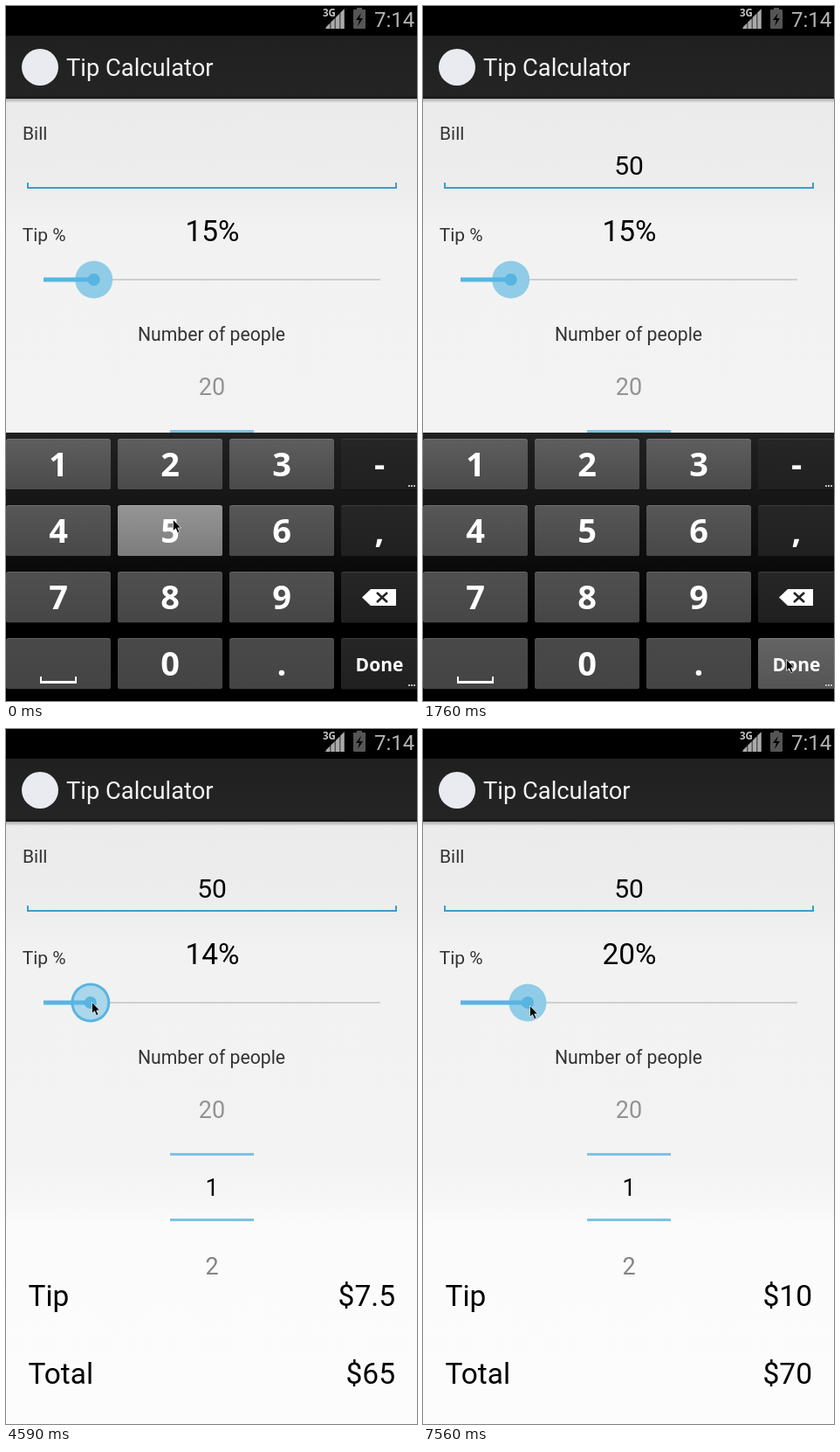
Write an HTML page with a canvas that moves like this. It is 471x795 px and loops after 8000 ms.

```html
<!DOCTYPE html>
<html lang="en">
<head>
<meta charset="utf-8">
<title>Tip Calculator</title>
<style>
  html, body { margin: 0; width: 100%; height: 100%; overflow: hidden; background: #fff; }
  canvas { display: block; }
</style>
</head>
<body>
<canvas id="stage" width="471" height="795"></canvas>
<script>
const ctx = document.getElementById('stage').getContext('2d');
const LOOP = 8000;

const STEP = 148.7;
const LEAD = 24;
const TYPE_5 = 1, PRESS_0 = 6, TYPE_0 = 7, PRESS_DONE = 12, CLOSE = 14;
const FADED = 20, GRAB = 31, DROP = 48;

const SLIDER_X = 42.8;
const SLIDER_UNIT = 3.86;

// Pointer stops: step, x, y.
const pointerPath = [
  [TYPE_5, 191, 587], [5, 181, 748],
  [TYPE_0, 181, 748], [10, 416, 747],
  [19, 416, 747], [22, 171, 405], [29, 98, 312],
  [33, 98, 312], [42, 125, 316], [46, 122, 316]
];

const clamp01 = v => Math.min(1, Math.max(0, v));
const smooth = k => k * k * (3 - 2 * k);
const gray = v => `rgb(${v},${v},${v})`;

function pointerAt(step) {
  const next = Math.max(1, pointerPath.findIndex(stop => stop[0] > step));
  const last = step >= pointerPath.at(-1)[0] ? pointerPath.length - 1 : next;
  const [t0, x0, y0] = pointerPath[last - 1];
  const [t1, x1, y1] = pointerPath[last];
  const k = clamp01((step - t0) / (t1 - t0));
  const eased = step > GRAB ? k : smooth(k);
  return [x0 + (x1 - x0) * eased, y0 + (y1 - y0) * eased];
}

function stateAt(step) {
  const pointer = pointerAt(step);
  const lastTyped = step < TYPE_0 ? TYPE_5 : TYPE_0;
  return {
    step,
    pointer,
    bill: step < TYPE_5 ? '' : step < TYPE_0 ? '5' : '50',
    pressed: step < TYPE_5 ? '5' : step === PRESS_0 ? '0' : step >= PRESS_DONE ? 'Done' : '',
    caret: step >= TYPE_5 && (step - lastTyped) % 6.75 < 3,
    percent: step < GRAB ? 15 : Math.floor((pointer[0] - SLIDER_X) / SLIDER_UNIT),
    dragging: step >= GRAB && step < DROP,
    tip: step < DROP ? '$7.5' : '$10',
    total: step < DROP ? '$65' : '$70'
  };
}

function rect(x, y, w, h, fill) {
  ctx.fillStyle = fill;
  ctx.fillRect(x, y, w, h);
}

function circle(x, y, r, fill) {
  ctx.beginPath();
  ctx.arc(x, y, r, 0, Math.PI * 2);
  ctx.fillStyle = fill;
  ctx.fill();
}

function polygon(points, fill) {
  ctx.beginPath();
  points.forEach(([x, y]) => ctx.lineTo(x, y));
  ctx.closePath();
  ctx.fillStyle = fill;
  ctx.fill();
}

function roundRect(x, y, w, h, r, fill) {
  ctx.beginPath();
  ctx.roundRect(x, y, w, h, r);
  ctx.fillStyle = fill;
  ctx.fill();
}

function vertical(y0, y1, ...stops) {
  const gradient = ctx.createLinearGradient(0, y0, 0, y1);
  stops.forEach(([y, color]) => gradient.addColorStop((y - y0) / (y1 - y0), color));
  return gradient;
}

function text(str, x, y, size, color = '#000', align = 'left', font = 'Roboto') {
  ctx.font = `${size}px ${font}, sans-serif`;
  ctx.textAlign = align;
  ctx.fillStyle = color;
  ctx.fillText(str, x, y);
}

function boldText(str, x, y, size, color, align) {
  text(str, x, y, size, color, align, '"Open Sans"');
  ctx.font = `bold ${ctx.font}`;
}

function keyText(str, x, y, size, color, align) {
  ctx.font = `bold ${size}px "Open Sans", sans-serif`;
  ctx.textAlign = align;
  ctx.fillStyle = color;
  ctx.fillText(str, x, y);
}

function drawBars() {
  rect(0, 0, 471, 34, '#000');
  keyText('3G', 363, 12, 11.5, '#c4c4c4', 'left');
  polygon([[365, 26], [388, 26], [388, 3]], '#555');
  for (let x = 367; x < 388; x += 5.5) {
    polygon([[x, 26], [x + 4, 26], [x + 4, 387 - x], [x, 391 - x]], '#aaa');
  }
  rect(402, 2, 6, 3, '#555');
  roundRect(398, 4, 14, 22, 1, '#555');
  polygon([[407, 8], [401, 16], [405, 16], [403, 23], [409, 14], [405, 14]], '#000');
  text('7:14', 422, 24, 24, '#b4b4b4');

  rect(0, 34, 471, 72, vertical(34, 106, [34, '#202020'], [102, '#242424'], [106, '#161616']));
  circle(39, 70, 21, '#e9ebf0');
  text('Tip Calculator', 69, 80, 27.3, '#f3f3f3');
}

function drawBackground(step) {
  rect(0, 106, 471, 689, vertical(106, 795,
    [106, '#ebebeb'], [205, '#ededed'], [255, '#f2f2f2'], [500, '#f3f3f3'],
    [540, '#f7f7f7'], [570, '#fbfbfb'], [795, '#fcfcfc']));
  rect(0, 106, 471, 5, vertical(106, 111, [106, 'rgba(0,0,0,.28)'], [111, 'rgba(0,0,0,0)']));
  if (step >= CLOSE && step < FADED) {
    // Faint remains of the keys while the keyboard fades away.
    rect(0, 583, 471, 57, 'rgba(0,0,0,.015)');
    for (let x = 0; x < 384; x += 128) rect(x, 583, 120, 45, 'rgba(255,255,255,.3)');
  }
}

function drawSlider(percent, dragging) {
  const x = SLIDER_X + SLIDER_UNIT * percent;
  rect(43, 312, 386, 2, '#cfcfcf');
  circle(x, 313, dragging ? 22.5 : 21.5, dragging ? '#58b4e0' : '#90cce7');
  if (dragging) circle(x, 313, 19.5, '#acd6ea');
  rect(43, 310.5, x - 43, 5, '#58b5e3');
  circle(x, 313, 7, '#58b4e0');
}

function drawForm({ bill, caret, percent, dragging, tip, total }) {
  text('Bill', 19, 153, 21, '#333');
  text(bill, 236, 193, 30, '#000', 'center');
  if (caret) rect(236 + bill.length * 8, 161, 1, 41, '#000');
  rect(24, 207, 424, 2, '#3d9dc9');
  for (const x of [24, 446]) rect(x, 202, 2, 5, '#3d9dc9');

  text('Tip %', 18.7, 269, 21, '#333');
  text(percent + '%', 236.5, 269, 33.4, '#000', 'center');
  drawSlider(percent, dragging);

  text('Number of people', 235.5, 383, 21.2, '#333', 'center');
  text('20', 236, 444.5, 27, '#939393', 'center');
  text('1', 236, 534, 27, '#000', 'center');
  text('2', 236, 624, 27, '#858585', 'center');
  for (const y of [485, 560]) rect(188, y, 96, 3, '#7dc2e5');

  [['Tip', tip, 660], ['Total', total, 749]].forEach(([label, amount, y]) => {
    text(label, 25.5, y, 33.4);
    text(amount, 446, y, 33.6, '#000', 'right');
  });
}

function drawKey(label, column, row, pressed) {
  const x = column * 128, y = 495 + row * 76, w = 120, h = 58;
  const dark = column === 3;
  const top = (dark ? 38 : 94 - row * 7) + (pressed ? 62 : 0);
  const bottom = (dark ? 32 : 74 - row * 2) + (pressed ? 52 : 0);
  roundRect(x, y + 1, w, h, 3, '#101010');
  roundRect(x, y, w, h, 3, gray(top + 22));
  roundRect(x, y + 1, w, h - 1, 3, vertical(y, y + h, [y, gray(top)], [y + h, gray(bottom)]));

  if (label === 'space') {
    rect(39, 772, 42, 3, '#fff');
    for (const edge of [39, 79]) rect(edge, 767, 2, 6, '#fff');
  } else if (label === 'delete') {
    polygon([[408, 676.5], [418, 667], [447, 667], [447, 686], [418, 686]], '#fff');
    ctx.beginPath();
    ctx.moveTo(425, 671);
    ctx.lineTo(437, 682);
    ctx.moveTo(437, 671);
    ctx.lineTo(425, 682);
    ctx.strokeStyle = '#222';
    ctx.lineWidth = 2.5;
    ctx.stroke();
  } else {
    const [size, baseline] = label === 'Done' ? [21, 38] : [38, 43];
    keyText(label, dark ? 428 : x + 60, y + baseline, size, '#fff', 'center');
  }
  if (label === '-' || label === 'Done') {
    for (let i = 0; i < 3; i++) rect(461 + i * 3, y + 53, 2, 2, '#bbb');
  }
}

function drawKeyboard(pressed) {
  rect(0, 488, 471, 307, vertical(488, 795, [488, '#212121'], [600, '#111'], [710, '#000'], [795, '#000']));
  const rows = [['1', '2', '3', '-'], ['4', '5', '6', ','], ['7', '8', '9', 'delete'], ['space', '0', '.', 'Done']];
  rows.forEach((labels, row) =>
    labels.forEach((label, column) => drawKey(label, column, row, label === pressed)));
}

function drawPointer([x, y]) {
  ctx.save();
  ctx.translate(Math.round(x) + 0.5, Math.round(y) + 0.5);
  polygon([[0, 0], [0, 13], [3, 10.2], [5.2, 15.2], [7.4, 14.2], [5.3, 9.4], [9, 9.4]], '#000');
  ctx.strokeStyle = 'rgba(255,255,255,.85)';
  ctx.lineWidth = 0.8;
  ctx.stroke();
  ctx.restore();
}

function draw() {
  const time = performance.now() % LOOP;
  const state = stateAt(Math.floor((time + LEAD) / STEP));
  drawBackground(state.step);
  drawForm(state);
  drawBars();
  if (state.step < CLOSE) drawKeyboard(state.pressed);
  drawPointer(state.pointer);
  requestAnimationFrame(draw);
}
draw();
</script>
</body>
</html>
```
